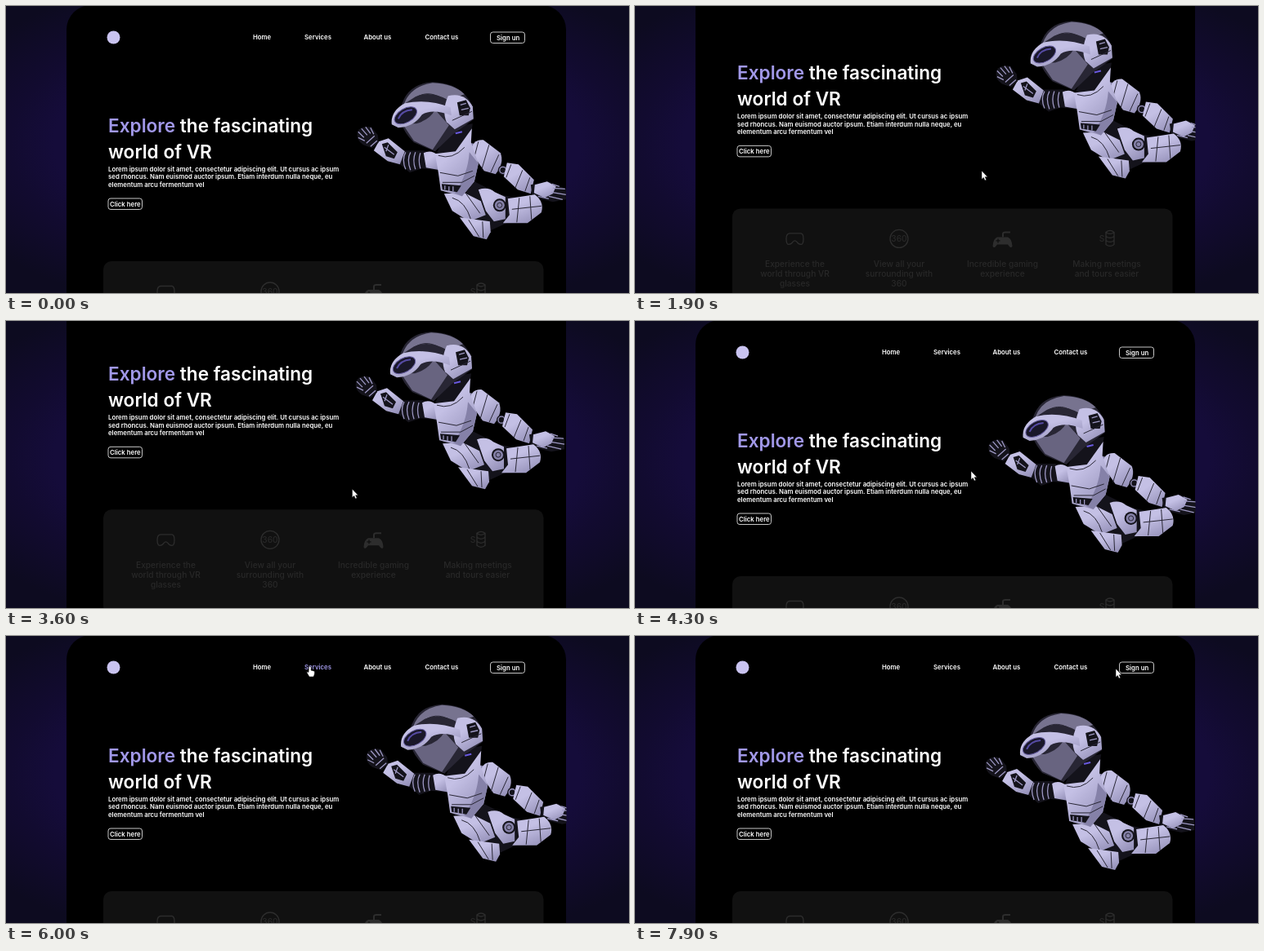
Recreate the animation shown at these times as an HTML page. Size 762 by 352 pixels, loop 8000 ms.

```html
<!DOCTYPE html>
<html lang="en">
<head>
<meta charset="utf-8">
<title>VR landing page</title>
<style>
html, body { margin: 0; width: 100%; height: 100%; overflow: hidden; background: #0e0b24; }
svg { display: block; width: 762px; height: 352px; font: 600 7.8px Inter, "Open Sans", sans-serif; fill: #fff; }
.title { font-size: 22.6px; }
.lilac, .hover { fill: #a198e8; }
.button { fill: none; stroke: #ddd; stroke-width: .9; }
.cards { font-size: 10.2px; font-weight: 500; fill: #282828; text-anchor: middle; }
.icon { fill: none; stroke: #2d2d2d; stroke-width: 1.3; }
.solid { fill: #2d2d2d; stroke: none; }
.shell { fill: url(#metal); }
.shade { fill: #8581a8; }
.dark { fill: #14131b; }
.rib { fill: none; stroke: #9c97c2; stroke-width: 1.3; }
.seam { fill: none; stroke: #282634; stroke-width: 1; }
</style>
</head>
<body>
<svg viewBox="0 0 762 352">
  <defs>
    <radialGradient id="glow" cx=".5" cy=".48" r=".64">
      <stop offset=".66" stop-color="#150c3a"/>
      <stop offset=".77" stop-color="#120b30"/>
      <stop offset="1" stop-color="#0d0b20"/>
    </radialGradient>
    <linearGradient id="metal" x1=".2" y1="0" x2=".8" y2="1">
      <stop offset=".35" stop-color="#c4c0e5"/>
      <stop offset="1" stop-color="#9490b8"/>
    </linearGradient>
    <clipPath id="edge"><rect x="400" y="50" width="285.5" height="260"/></clipPath>
  </defs>
  <rect width="762" height="352" fill="url(#glow)"/>

  <g id="page">
    <rect x="74" y="-1" width="611" height="465" rx="30" fill="#000"/>
    <circle cx="131.5" cy="38.5" r="8" fill="#c9c3f0"/>
    <g id="nav">
      <text x="302" y="41">Home</text>
      <text x="365" y="41">Services</text>
      <text x="437.5" y="41">About us</text>
      <text x="512.5" y="41">Contact us</text>
      <text x="600" y="41.7">Sign un</text>
    </g>
    <rect class="button" x="592.5" y="32" width="42" height="13.5" rx="3"/>

    <g class="title">
      <text x="125" y="154.5"><tspan class="lilac">Explore</tspan> the fascinating</text>
      <text x="125" y="187">world of VR</text>
    </g>
    <text x="125" y="202.8">Lorem ipsum dolor sit amet, consectetur adipiscing elit. Ut cursus ac ipsum</text>
    <text x="125" y="212.4">sed rhoncus. Nam euismod auctor ipsum. Etiam interdum nulla neque, eu</text>
    <text x="125" y="222">elementum arcu fermentum vel</text>
    <rect class="button" x="125" y="236" width="41.5" height="13.5" rx="3"/>
    <text x="127" y="245.5">Click here</text>

    <rect x="119" y="313" width="538.5" height="128" rx="10" fill="#111"/>
    <g class="cards" id="cards"></g>
    <g class="icon">
      <path d="M189 343.500H203Q206 344 206 350Q206 357 203 357Q200 357 198 354Q195.500 351 193 354Q191 357 188 357Q185 357 185 350Q185 344 189 343.500Z"/>
      <circle cx="323" cy="350" r="11"/>
      <path class="solid" d="M443 348H456Q461 350 461.500 359Q460 363 456 357H443Q439 363 437.500 359Q438 350 443 348Z"/>
      <path d="M450 348V344Q450 342 453 342H459" stroke-width="2"/>
      <path d="M444 350v5m-2.500-2.500h5" stroke="#111"/>
      <path d="M576 342v15q5 4 10 0v-15q-5-4-10 0q5 4 10 0M576 347q5 4 10 0M576 352q5 4 10 0"/>
    </g>
    <g class="cards">
      <text x="323" y="353.5">360</text>
      <text x="571" y="354">S</text>
    </g>

    <g clip-path="url(#edge)"><g id="robot">
      <!-- reaching arm -->
      <path class="dark" d="M484 178L510 178 528 184 528 202 508 200 493 205 480 194Z"/>
      <path class="rib" d="M488 180q-5 9 0 21M494 180q-5 9 0 22M500 180q-4 10 0 21M506 181q-3 9 0 19"/>
      <path class="shell" d="M510 181Q519 176 528 184L530 202 513 199Z"/>
      <path class="shell" d="M455 167L467 163 487 179 481 195 466 191 449 178Z"/>
      <path class="dark" d="M459 170L466 168 478 180 474 188 464 185Z"/>
      <path class="rib" d="M462 174l12 9M467 171l-3 8"/>
      <path class="dark" d="M429 155Q433 147 446 149L454 159 455 168 447 175 436 171Q427 165 429 155Z"/>
      <path class="rib" d="M430 155l7 7M434 151l7 8M439 149l6 8M445 150l4 8M430 162l8 4M440 169l10-9M445 173l8-7"/>
      <!-- far arm -->
      <circle class="shade" cx="569" cy="175" r="6"/>
      <path class="shell" d="M568 180Q569 164 583 165L604 181Q609 193 598 207L584 203Z"/>
      <path class="seam" d="M577 167L572 186M590 171L581 201M602 183L592 205"/>
      <circle class="dark" cx="607" cy="202" r="6"/>
      <circle class="rib" cx="607" cy="202" r="4"/>
      <path class="shell" d="M612 193L626 195 645 214 641 231 625 226 608 210Z"/>
      <path class="seam" d="M617 195L611 211M631 202L622 224M640 211L634 228"/>
      <path class="dark" d="M641 220L663 216 684 225 684 238 668 241 643 235Z"/>
      <path class="shell" d="M646 220L661 216 672 222 668 231 658 236 645 230Z"/>
      <path class="rib" d="M667 219l9 3M668 224l15 1M666 229l18 3M663 234l17 4M650 234l13 3"/>
      <!-- legs -->
      <path class="dark" d="M534 226L572 216 604 232 622 236 618 264 592 276 558 264Z"/>
      <path class="shell" d="M535 231L560 230 580 240 586 257 566 265 545 252Z"/>
      <path class="seam" d="M545 236Q561 240 568 263M562 231L579 255"/>
      <path class="shell" d="M577 226Q589 222 597 229L610 235 610 262 596 265 586 252Z"/>
      <circle class="dark" cx="603" cy="245" r="8"/>
      <circle class="shade" cx="603" cy="245" r="6"/>
      <circle class="seam" cx="603" cy="245" r="3"/>
      <path class="shell" d="M613 237L646 232Q658 241 654 254L637 267 607 267 615 257Z"/>
      <path class="seam" d="M627 236L624 266M640 234L642 263M618 250L654 246"/>
      <path class="shell" d="M554 260L591 265 592 278 587 287 571 283Z"/>
      <path class="seam" d="M565 263L578 284M582 265L583 285"/>
      <!-- torso -->
      <path class="dark" d="M540 150L570 145 567 166 545 184 526 181Z"/>
      <path class="shell" d="M524 182L549 179 569 151 568 168 577 194 572 216 557 234 531 227 528 205Z"/>
      <path class="shade" d="M566 180L577 194 572 216 557 234 548 230Q564 208 566 180Z"/>
      <path class="seam" d="M528 184Q545 190 560 174M530 205L552 209 570 203M533 217H557L572 209"/>
      <path class="dark" d="M532 219L556 221 551 229 533 226Z"/>
      <path class="rib" d="M536 221v5M541 222v6M546 222v6"/>
      <!-- head -->
      <path fill="#282634" d="M482 126Q489 96 521 94Q556 95 569 122L571 140 546 158 524 179 498 168Q486 156 483 145Z"/>
      <path fill="#77738f" d="M486 121Q494 99 521 95Q547 96 560 109L540 116Q518 104 500 112Z"/>
      <path fill="#686480" d="M484 145L501 145Q518 140 524 128L541 147 521 177 498 166Z"/>
      <path class="seam" d="M499 114Q517 101 538 118L542 149 523 177"/>
      <path class="shell" d="M540 111Q560 106 570 124L571 139 548 152 538 143Q532 129 540 111Z"/>
      <path class="shell" d="M471 146Q469 130 487 120Q514 114 543 125L544 135Q521 126 508 134Q498 149 479 150Z"/>
      <ellipse cx="488" cy="135" rx="15" ry="8.5" transform="rotate(-30 488 135)" fill="#191729" stroke="#665d9f"/>
      <path d="M479 139Q483 129 496 128" fill="none" stroke="#554aa3" stroke-width="2"/>
      <path class="dark" d="M551 119L562 116 567 126 565 135 554 135Z"/>
      <path class="rib" d="M555 122l7-2M556 128l9-2"/>
      <path class="seam" d="M545 141L569 130"/>
      <path d="M549 157l8-2" stroke="#6959df" stroke-width="2"/>
    </g></g>
  </g>

  <g id="cursor" stroke="#000" stroke-width=".5">
    <path id="arrow" d="M0 0V10.500L2.300 8.400 4 12 5.800 11.200 4.200 7.700H7.300Z"/>
    <path id="hand" d="M-1.500-5Q0-6.500 1-5V-1L5 0Q6 1 5 5L4 7H-1L-4 2Q-4.500 0-2 1.500Z"/>
  </g>
</svg>
<script>
const LOOP = 8000;
const $ = id => document.getElementById(id);
const smooth = u => (u = Math.min(1, Math.max(0, u))) * u * (3 - 2 * u);

const cards = [
  [195.5, "Experience the", "world through VR", "glasses"],
  [323, "View all your", "surrounding with", "360"],
  [449.5, "Incredible gaming", "experience"],
  [577, "Making meetings", "and tours easier"]
];
$("cards").innerHTML = cards.map(([x, ...lines]) => lines.map((line, i) =>
  `<text x="${x}" y="${384.5 + 12 * i}">${line}</text>`).join("")).join("");

// time, x, y of the pointer
const route = [
  [100, 770, 300], [850, 418, 203], [1100, 417, 201], [1900, 424, 202],
  [2900, 426, 209], [3500, 424, 207], [4300, 411, 184], [4950, 130, 36],
  [5450, 312, 42], [6000, 372, 43], [6250, 378, 42], [6800, 454, 41],
  [7350, 533, 41], [7900, 588, 40], [8000, 594, 39]
];
function pointer(t) {
  const i = Math.max(1, route.findIndex(p => p[0] >= t));
  const [a, b] = [route[i - 1], route[i]];
  const u = smooth((t - a[0]) / (b[0] - a[0]));
  return [a[1] + (b[1] - a[1]) * u, a[2] + (b[2] - a[2]) * u];
}

const links = [...$("nav").children];
const areas = [[302, 324], [365, 397], [437, 472], [512, 554], [592, 635]];

function draw(now) {
  const t = now % LOOP;
  const scroll = 110.5 * (smooth((t - 1233) / 1200) - smooth((t - 3350) / 750));
  $("page").setAttribute("transform", `translate(0 ${-scroll})`);

  const drift = 6.5 + 7.5 * Math.cos((t - 1550) / 4000 * 2 * Math.PI);
  $("robot").setAttribute("transform", `translate(${drift} ${-0.84 * drift})`);

  const [x, y] = pointer(t);
  const over = scroll < 1 && y > 32 && y < 46
    ? areas.findIndex(([l, r]) => x >= l && x <= r) : -1;
  links.forEach((link, i) => link.classList.toggle("hover", i === over));
  $("cursor").setAttribute("transform", `translate(${x} ${y})`);
  $("arrow").style.display = over < 0 ? "" : "none";
  $("hand").style.display = over < 0 ? "none" : "";
  requestAnimationFrame(draw);
}
requestAnimationFrame(draw);
</script>
</body>
</html>
```
